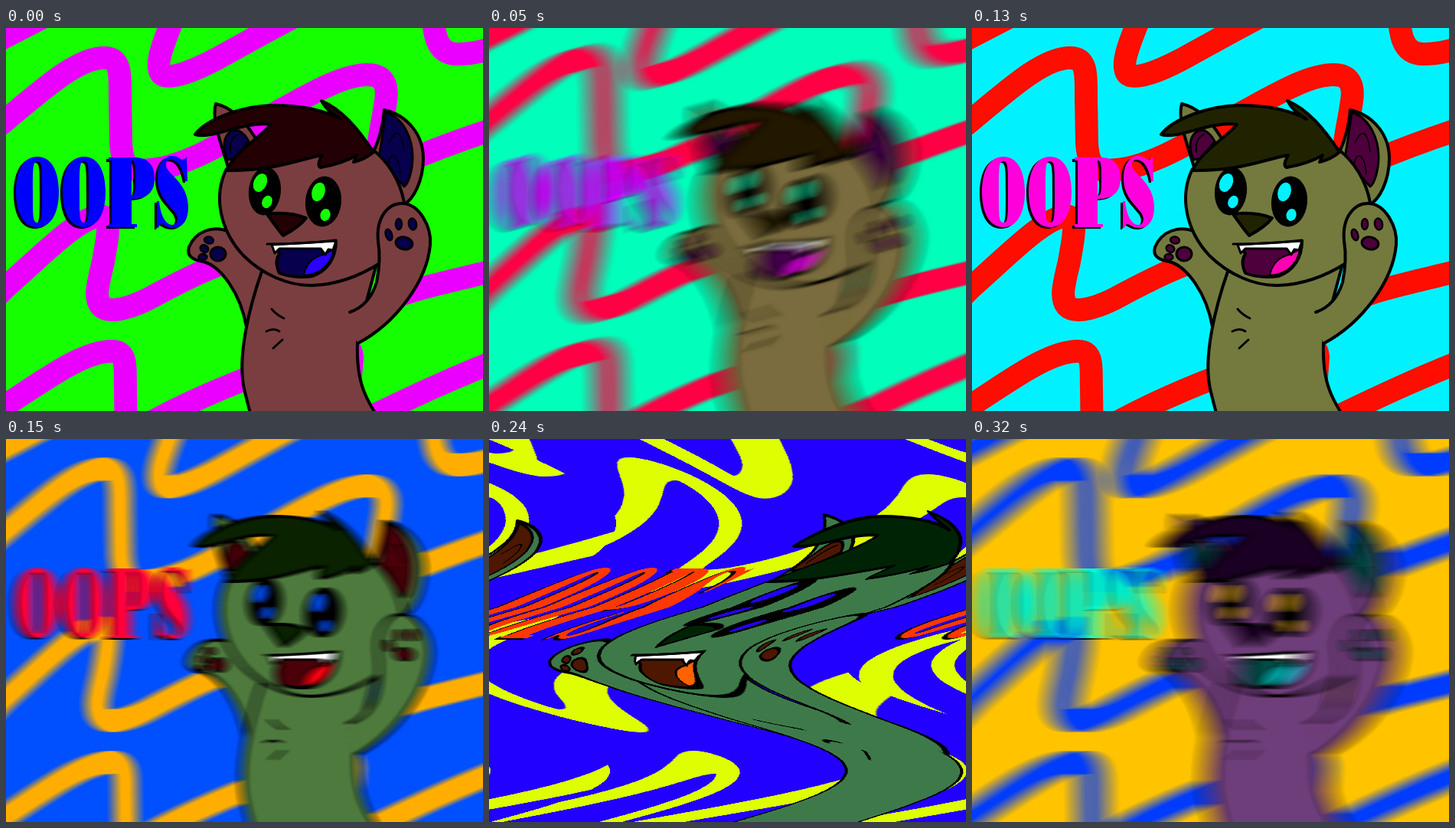
Animation of 623x500 px, one loop 370 ms. Source, as an HTML page with a canvas:

```html
<!DOCTYPE html>
<html lang="en">
<head>
<meta charset="utf-8">
<title>Oops</title>
<style>
html, body { margin: 0; width: 100%; height: 100%; overflow: hidden; }
canvas { display: block; }
</style>
</head>
<body>
<canvas id="stage" width="623" height="500" role="img" aria-label="OOPS"></canvas>
<script>
const W = 623, H = 500, PAD = 40;
const stage = document.getElementById('stage').getContext('2d');
const scene = document.createElement('canvas');
scene.width = W + 2 * PAD;
scene.height = H + 2 * PAD;
const g = scene.getContext('2d');

// Every colour derives from one hue per pose.
const poses = [
  { ms: 50, hue: 115 },
  { ms: 50, hue: 164, blur: 44, angle: -0.27 },
  { ms: 50, hue: 183 },
  { ms: 50, hue: 221, blur: 20, angle: 0 },
  { ms: 70, hue: 248, wave: true },
  { ms: 50, hue: 356 },
  { ms: 50, hue: 46, blur: 44, angle: 0 }
];
const LOOP = poses.reduce((sum, p) => sum + p.ms, 0);

const stripes = new Path2D(
  'M-60 42L60-20' +
  'M-40 152L0 120C55 74 95 39 128 39C151 39 149 62 149 90L150 150C152 185 165 188 190 185' +
  'C240 180 300 140 350 112C400 85 440 61 472 61C494 61 499 75 496 95C490 140 475 178 500 178' +
  'C515 177 530 171 545 165C570 155 600 143 670 121' +
  'M225-30C215 0 191 45 203 60C212 70 250 55 290 32C330 10 360-7 400-27' +
  'M557-40C557 10 562 34 590 34C610 34 630 29 670 16' +
  'M-40 378L0 338C50 294 92 250 122 245C140 246 132 275 127 305' +
  'C120 335 115 352 124 363C135 374 165 366 200 346C240 325 270 310 330 290' +
  'M500 354C530 342 560 335 670 309' +
  'M-40 515L0 492C50 460 100 422 138 422C160 422 155 445 156 470L157 545' +
  'M180 520C230 492 280 470 340 448C400 425 450 395 452 430L448 480' +
  'M440 525C500 497 560 465 670 423');

const oh = x => `M${x} 168C${x + 19} 168 ${x + 28} 188 ${x + 28} 214S${x + 19} 260 ${x} 260` +
  `S${x - 28} 240 ${x - 28} 214S${x - 19} 168 ${x} 168Z` +
  `M${x} 174C${x - 6} 174 ${x - 6} 182 ${x - 6} 214S${x - 6} 254 ${x} 254` +
  `S${x + 6} 246 ${x + 6} 214S${x + 6} 174 ${x} 174Z`;
const lettering = new Path2D(oh(41) + oh(102) +
  'M134 169H168C187 169 194 181 194 196C194 213 186 223 164 223V256H171V260H134V256H138V173H134Z' +
  'M164 173V219C169 219 169 212 169 196S169 173 164 173Z' +
  'M236 168L237 200H234C231 182 224 172 215 172C208 172 207 180 212 186' +
  'C220 196 238 208 238 234C238 252 230 261 219 261C210 261 206 256 203 256' +
  'C201 256 200 258 199 261H197V226H200C202 246 209 257 217 257C225 257 226 247 220 240' +
  'C212 229 198 220 198 196C198 178 206 167 217 167C225 167 228 172 231 172Q233 172 236 168Z');

function shape(d, fill, line = 4) {
  const path = new Path2D(d);
  if (fill) {
    g.fillStyle = fill;
    g.fill(path);
  }
  if (line) {
    g.lineWidth = line;
    g.strokeStyle = '#000';
    g.stroke(path);
  }
}

function oval(x, y, rx, ry, tilt, fill, line = 0) {
  g.beginPath();
  g.ellipse(x, y, rx, ry, tilt, 0, 7);
  g.fillStyle = fill;
  g.fill();
  if (line) {
    g.lineWidth = line;
    g.strokeStyle = '#000';
    g.stroke();
  }
}

function drawBackdrop(bg, stripe, text) {
  g.fillStyle = bg;
  g.fillRect(-PAD, -PAD, scene.width, scene.height);
  g.strokeStyle = stripe;
  g.lineWidth = 30;
  g.stroke(stripes);
  g.save();
  g.translate(-3, 2);
  g.fillStyle = '#000';
  g.fill(lettering, 'evenodd');
  g.restore();
  g.fillStyle = text;
  g.fill(lettering, 'evenodd');
}

function drawBear(fur, hair, skin, tongue, shine) {
  // ears
  shape('M290 182C281 150 268 120 274 99Q302 105 326 144', fur);
  shape('M289 172C279 146 290 131 304 134Q312 138 317 148L300 170Z', skin, 3);
  shape('M293 162Q291 144 303 139', null, 2);
  shape('M480 162Q492 135 494 107C525 114 545 140 545 170C545 200 532 224 519 231Z', fur);
  shape('M496 110C520 118 531 145 531 168C531 185 526 203 520 207L487 170Q492 140 496 110Z', skin, 3);
  shape('M499 186C498 162 512 158 515 190M500 150Q515 120 520 162', null, 1.5);

  // left arm, then torso
  shape('M292 266C270 257 248 265 239 286C235 299 246 303 258 305C280 311 306 345 314 390L345 320Z', fur);
  oval(265, 277, 6, 4.5, 0.2, skin, 2.5);
  oval(259, 288, 5.5, 4.5, 0.5, skin, 2.5);
  oval(257, 299, 5.5, 4, 0, skin, 2.5);
  oval(277, 295, 10, 9, 0, skin, 3);
  shape('M334 318C320 358 300 430 312 475Q315 488 325 525H497C470 485 457 465 459 411L470 360L484 308Z', fur);
  shape('M347 367Q354 375 363 379M340 396Q350 391 357 396M349 418L361 407', null, 3);

  // head, its top edge tucked under the hair
  shape('M288 184C270 220 280 265 310 297C335 322 370 337 400 336C435 335 465 322 490 306' +
    'C515 280 525 250 520 228C515 200 500 175 478 158L400 130L330 165Z', fur);

  // raised right arm
  shape('M449 371Q475 362 484 332Q490 303 486 278C483 246 500 229 517 229' +
    'C540 229 556 260 554 283C550 330 510 385 459 412', fur);
  oval(500, 270, 4, 7.5, -0.3, skin, 2.5);
  oval(513, 256, 4, 7, 0, skin, 2.5);
  oval(531, 256, 5, 7.5, -0.2, skin, 2.5);
  oval(520, 281, 11, 8, 0.2, skin, 3);

  // hair
  shape('M247 139C262 119 310 101 350 101C385 101 415 107 437 119Q420 110 412 95' +
    'C438 106 459 130 480 162Q470 171 454 175L458 166Q440 177 411 182Q405 180 413 166' +
    'C380 172 350 187 288 186C300 160 330 145 346 126C310 121 270 146 247 139Z', hair);

  // face
  oval(338, 213, 21, 31.5, 0.1, '#000');
  oval(332, 202, 8.5, 12.5, 0.4, shine);
  oval(341, 227, 6.5, 8.5, 0.4, shine);
  oval(414.5, 226.5, 23.5, 33, 0.1, '#000');
  oval(408, 214, 8.5, 12.5, 0.3, shine);
  oval(417, 244, 6.5, 8, 0.3, shine);
  shape('M341 243Q368 239 392 248Q384 259 362 271Q356 264 341 243Z', hair);
  shape('M354 288L357 295Q350 305 357 320Q375 327 400 324C420 317 431 300 431 278Z', skin);
  shape('M389 323C392 306 402 299 414 296L428 289C425 309 410 322 389 323Z', tongue, 2);
  shape('M347 283L431 278L427 290L421 289L417 296L411 288H357L351 294Z', '#fff', 3);
  shape('M341 282Q390 282 431 277', null, 3);
}

function drawScene(h) {
  const tint = (turn, sat = 100, light = 50) => `hsl(${(h + turn + 360) % 360}, ${sat}%, ${light}%)`;
  g.setTransform(1, 0, 0, 1, PAD, PAD);
  g.lineCap = g.lineJoin = 'round';
  drawBackdrop(tint(0), tint(180), tint(125));
  drawBear(tint(-117, 33, 36), tint(-120, 100, 6.8), tint(130, 100, 15), tint(135), tint(0));
}

// Box blur along a line: halving shifts, each averaged with the last result.
function smear(length, angle) {
  const dx = Math.cos(angle), dy = Math.sin(angle);
  let total = 0;
  g.setTransform(1, 0, 0, 1, 0, 0);
  g.globalAlpha = 0.5;
  for (let s = length / 2; s > 1; s /= 2) {
    g.drawImage(scene, s * dx, s * dy);
    total += s;
  }
  g.globalAlpha = 1;
  stage.drawImage(scene, -PAD - total * dx / 2, -PAD - total * dy / 2);
}

// Sideways shift of a row: three half sine waves of shrinking height.
function shift(y) {
  if (y < 219) return 166 * Math.sin(Math.PI * y / 219);
  if (y < 366) return -159 * Math.sin(Math.PI * (y - 219) / 147);
  return 158 * Math.sin(Math.PI * (y - 366) / 134);
}

function ripple() {
  for (let y = 0; y < H; y++) {
    const x = Math.round(shift(y));
    for (const wrap of [-W, 0, W]) {
      stage.drawImage(scene, PAD, PAD + y, W, 1, x + wrap, y, W, 1);
    }
  }
}

function poseAt(ms) {
  for (const p of poses) {
    if (ms < p.ms) return p;
    ms -= p.ms;
  }
  return poses[0];
}

const start = performance.now();
let shown;
function tick() {
  const pose = poseAt((performance.now() - start) % LOOP);
  if (pose !== shown) {
    shown = pose;
    drawScene(pose.hue);
    if (pose.blur) smear(pose.blur, pose.angle);
    else if (pose.wave) ripple();
    else stage.drawImage(scene, -PAD, -PAD);
  }
  requestAnimationFrame(tick);
}
tick();
</script>
</body>
</html>
```
